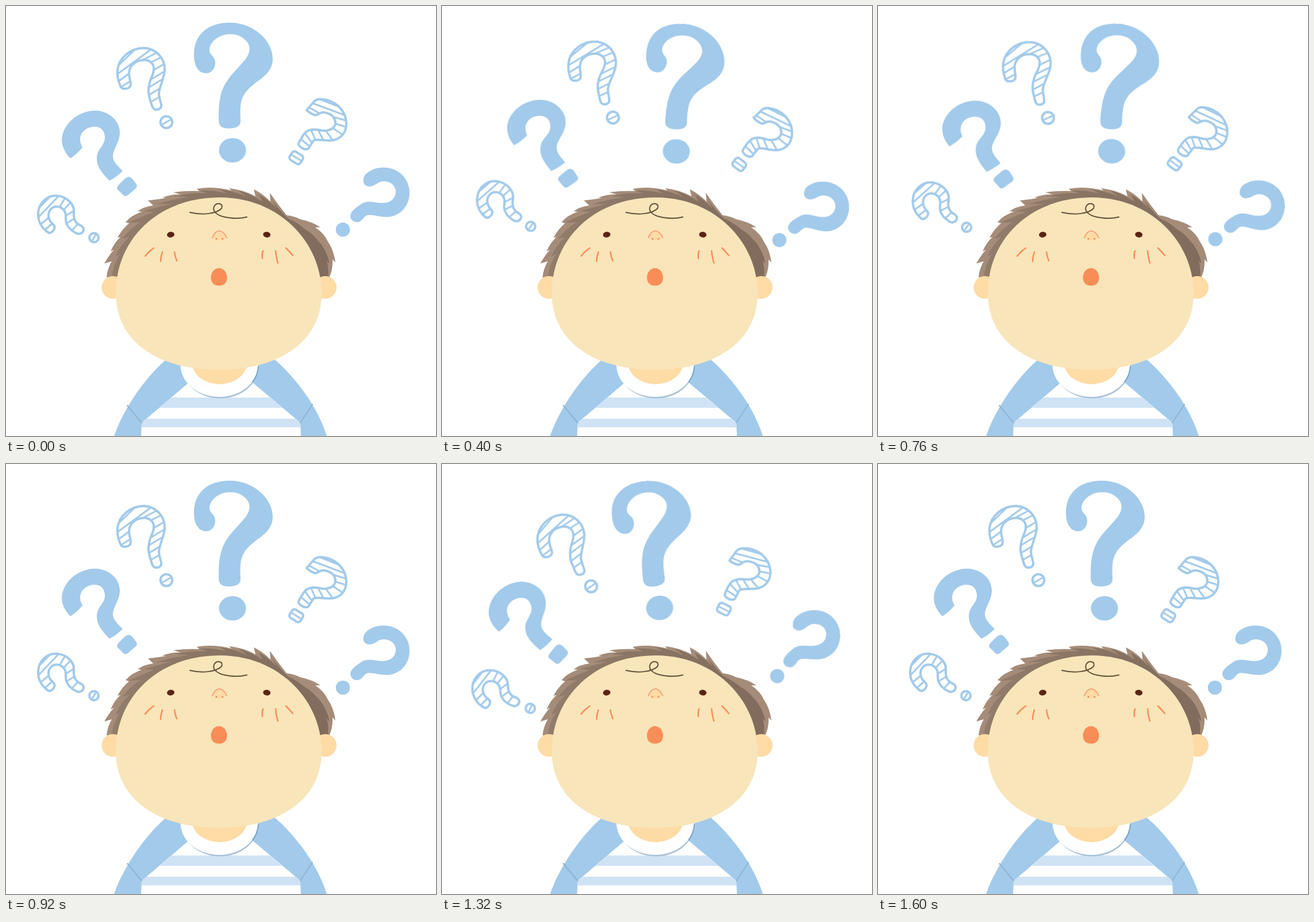
An HTML page that plays this animation: 748x748 px, repeating every 1.88 s.

```html
<!DOCTYPE html>
<html lang="en">
<head>
<meta charset="utf-8">
<title>Wondering child</title>
<style>
  html, body { margin: 0; width: 100%; height: 100%; overflow: hidden; background: #fff; }
  svg { display: block; width: 100%; height: 100%; }
  .blue { fill: #a2caeb; }
  .line { fill: none; stroke-linecap: round; stroke-linejoin: round; }
  .hollow { fill: none; stroke: #a2caeb; stroke-width: 4; stroke-linejoin: round; stroke-linecap: round; }
  .rungs { stroke-width: 3; }
  .blush { stroke: #f98d57; stroke-width: 2.5; }
  .skin { fill: #ffdba5; }
  #marks { transform-origin: 379px 408px; animation: sway 1880ms infinite; }
  /* linear swings, redrawn every 40 ms, then a rest */
  @keyframes sway {
    0% { transform: rotate(0deg); animation-timing-function: steps(16, end); }
    34.04255% { transform: rotate(8deg); animation-timing-function: steps(14, end); }
    63.82979% { transform: rotate(-8deg); animation-timing-function: steps(10, end); }
    85.10638%, 100% { transform: rotate(0deg); }
  }
</style>
</head>
<body>
<svg viewBox="0 0 748 748">
  <defs>
    <path id="hookA" d="M72 393C62 386 55 374 56 360C57 342 72 329 88 330C106 331 119 345 118 358C117 368 120 376 126 380C132 382 136 386 135 390C133 396 127 398 122 395C110 389 103 381 104 368C105 357 98 349 88 349C79 349 73 357 74 366C75 374 79 377 83 381C86 384 84 390 80 393C77 395 74 395 72 393Z"/>
    <path id="hookB" d="M199 139C195 130 193 121 194 112C196 90 217 73 240 73C262 74 277 92 276 112C275 127 267 139 266 152C266 160 269 165 270 172C271 179 264 181 259 180C254 178 253 170 251 164C247 152 247 144 250 133C252 124 258 118 257 107C256 98 247 93 238 94C224 95 214 105 214 117C214 125 217 130 217 137C216 144 206 145 202 143Q200 142 199 139Z"/>
    <path id="hookC" d="M523 181L537 165Q541 162 547 162C575 163 592 184 592 205C592 222 580 234 563 234C550 234 541 231 535 234Q531 240 526 248Q521 251 515 247Q508 243 509 239Q514 228 520 221C526 214 535 214 546 216C560 219 572 214 573 204C573 193 565 187 553 185C547 184 544 188 539 190Q530 188 523 181Z"/>
    <clipPath id="clipA"><use href="#hookA"/></clipPath>
    <clipPath id="clipB"><use href="#hookB"/></clipPath>
    <clipPath id="clipC"><use href="#hookC"/></clipPath>
    <linearGradient id="shade">
      <stop offset="0" stop-color="#927c6a"/>
      <stop offset="1" stop-color="#806b5c"/>
    </linearGradient>
  </defs>

  <!-- shirt -->
  <path class="blue" d="M282 612C248 640 207 694 188 748H558C541 694 500 642 464 612Z"/>
  <path fill="#fff" d="M318 655L236 725L235 748H513L512 725L429 655Z"/>
  <path fill="#cfe3f5" d="M288 681H459L481 699H267ZM244 718H504L512 725V733H235.500L236 725Z"/>
  <path class="line" stroke="#8fb4cf" stroke-width="2" d="M211 695L236 725M533 693L512 725"/>
  <ellipse cx="372.500" cy="626" rx="67" ry="56.500" fill="#a9c1d6"/>
  <ellipse cx="371" cy="624.500" rx="67.500" ry="55.500" fill="#fff"/>
  <path class="line" stroke="#76a2cb" stroke-width="2" d="M439 627Q438 642 429 654"/>
  <ellipse class="skin" cx="371.500" cy="620" rx="48" ry="38"/>

  <!-- hair -->
  <path fill="#a58c79" d="M175 472Q176 458 184 444L171 448Q180 432 188 424L182 427Q188 412 199 402L194 403Q202 388 214 378L208 376Q218 364 236 358L229 357Q240 349 256 347L247 338Q262 337 278 334L272 333Q290 327 304 328L291 324Q315 321 336 322L332 318Q360 313 392 321L388 317Q414 320 434 331L431 319Q446 326 460 340L459 325Q472 344 488 364Q500 365 512 371Q532 375 547 385L538 385Q554 396 560 410Q570 424 573 446L568 441Q569 458 562 473H195Z"/>
  <path fill="url(#shade)" d="M184 472Q185 454 198 432L190 436Q199 416 214 402L202 405Q215 388 234 376L213 377Q236 366 258 358L240 357Q262 350 288 344L262 345Q292 335 318 333L296 331Q322 324 350 326L336 321Q362 320 384 326L372 319Q396 321 420 333L404 321Q428 328 446 340L440 328Q458 338 470 352L463 338Q476 356 490 369Q510 378 526 394L518 387Q538 398 546 414L541 405Q558 424 563 448L558 443Q562 460 560 472H372Z"/>

  <!-- head -->
  <circle class="skin" cx="186" cy="489.500" r="19.700"/>
  <circle class="skin" cx="555.300" cy="489.500" r="19.700"/>
  <path fill="#f8e5ba" d="M191 500C191 405 265 333 372 333C475 333 549 411 549 500C549 584 475 633 370 633C265 633 191 584 191 500Z"/>
  <path class="line" stroke="#62523b" stroke-width="2" d="M320 359C340 364 366 362 375 352C379 344 368 341 363 347C358 355 364 362 376 366C392 370 408 370 419 367"/>
  <ellipse cx="286.500" cy="397.700" rx="6.500" ry="4.900" fill="#5c2415" transform="rotate(-8 286.500 397.700)"/>
  <ellipse cx="453.700" cy="397.700" rx="6.500" ry="4.900" fill="#5c2415" transform="rotate(8 453.700 397.700)"/>
  <path class="skin" d="M360 403C362 388 381 388 383 403Q377 410 371 408Q365 410 360 403Z"/>
  <path class="line" stroke="#f4956a" stroke-width="1.600" d="M359 403Q363 392 371 391Q379 392 384 403"/>
  <g fill="#f4895a"><circle cx="366" cy="405" r="1.600"/><circle cx="376.500" cy="405" r="1.600"/></g>
  <path fill="#f98d57" d="M370.500 456C379 456 384.500 464 384.500 472C384.500 482 379 486.500 370.500 486.500C362 486.500 356.500 482 356.500 472C356.500 464 362 456 370.500 456Z"/>
  <path class="line blush" d="M242 435Q248 427 257 421M272 428Q269 436 269 444M293 428Q294 436 297 443M447 426Q445 432 446 439M469 426Q470 438 473 447M487 421Q493 427 499 434"/>

  <!-- question marks -->
  <g id="marks">
    <g class="blue">
      <path d="M327 85C327 50 350 29 390 29C430 29 464 60 464 92C464 115 445 125 430 137C415 149 409 160 408 175C407 188 408 195 408 200C408 208 402 213 388 213C374 213 370 208 370 197C370 180 370 160 378 142C386 124 402 110 412 98C424 85 428 72 418 61C411 53 402 49 391 49C375 49 362 56 356 68C352 76 354 82 359 87C363 91 364 95 364 100C363 110 357 117 348 117C334 117 327 103 327 85Z"/>
      <ellipse cx="394" cy="251" rx="23.500" ry="21.300"/>
      <path d="M112 265C102 255 97 244 97 232C99 205 125 182 156 182C180 183 198 200 198 220C198 236 188 246 186 259C185 270 193 277 203 287Q193 297 180 304C168 291 158 281 158 265C158 248 172 243 172 229C172 217 165 210 154 210C140 210 129 220 129 232C129 238 131 242 133 246Q123 258 112 265Z"/>
      <path d="M193 317Q193 314 197 310L207 300Q214 294 220 301L227 310Q229 314 225 318L212 329Q207 333 203 328L195 320Q193 319 193 317Z"/>
      <path d="M622 301C622 292 637 281 657 281C683 281 702 301 702 325C702 349 684 367 662 367C647 367 637 362 628 364C622 366 619 376 611 376C604 376 599 371 599 365C600 356 609 351 617 345C625 339 634 340 645 342C662 345 676 340 678 325C679 312 668 305 657 305C647 305 643 313 633 314C625 314 620 308 622 301Z"/>
      <circle cx="586" cy="389" r="12.300"/>
    </g>
    <g class="hollow">
      <use href="#hookA"/>
      <path class="rungs" clip-path="url(#clipA)" d="M54 355L80 328M54 370L94 328M60 380L78 365M67 390L82 377M92 352L104 332M100 355L114 340M102 366L120 355M104 379L120 369M114 391L126 378"/>
      <circle cx="153" cy="403" r="8"/>
      <path class="rungs" d="M150 408L156 398"/>

      <use href="#hookB"/>
      <path class="rungs" clip-path="url(#clipB)" d="M193 106L224 76M193 119L253 75M197 130L216 116M200 141L219 129M236 95L266 79M250 99L274 87M256 112L278 99M250 129L277 113M246 143L271 128M247 156L268 143M250 168L269 157"/>
      <circle cx="279" cy="202" r="10.300"/>
      <path class="rungs" d="M272 206L286 198"/>

      <use href="#hookC"/>
      <path class="rungs" clip-path="url(#clipC)" d="M526 176L546 187M533 169L592 191M548 163L586 178M570 193L594 200M571 204L593 211M565 210L587 225M555 215L570 236M542 214L553 235M530 214L539 235M519 220L533 239M512 231L528 244"/>
      <g transform="translate(505 264) rotate(32)">
        <rect x="-11" y="-8.500" width="22" height="17" rx="5"/>
        <path class="rungs" d="M-9 0H9"/>
      </g>
    </g>
  </g>
</svg>
</body>
</html>
```
